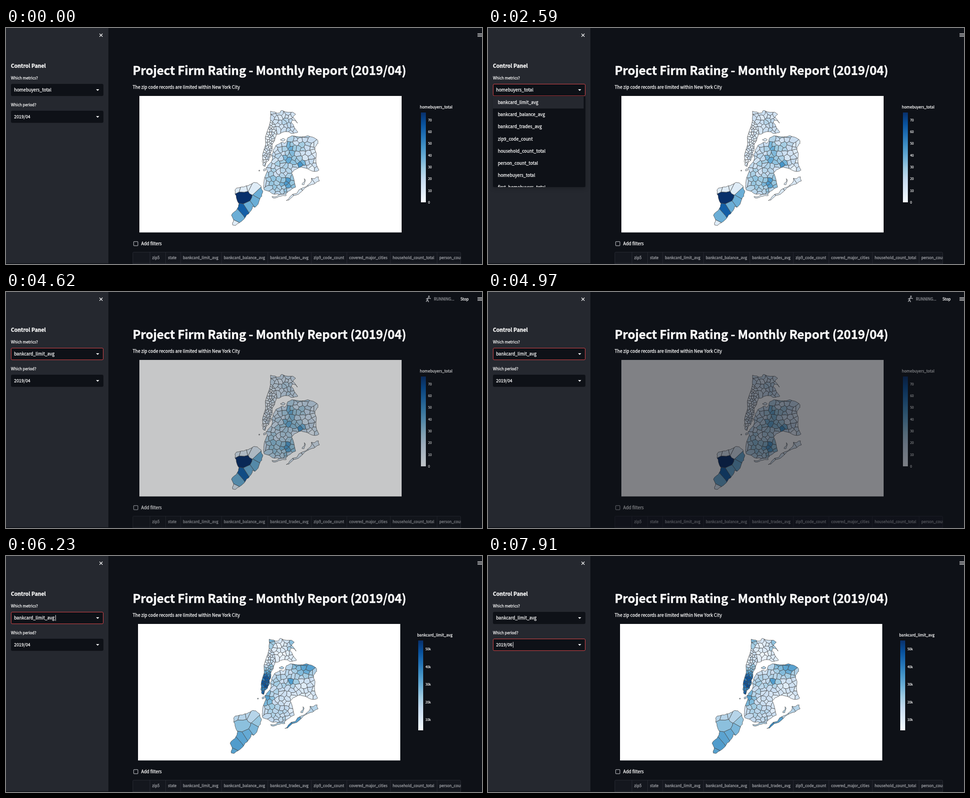
These frames come from a looping animation (1060x528 px, 8 s). An HTML page:

```html
<!DOCTYPE html>
<html lang="en">
<head>
<meta charset="utf-8">
<title>Monthly report dashboard</title>
<style>
html, body { margin: 0; width: 100%; height: 100%; overflow: hidden; background: #0e1117; }
svg { display: block; }
text { font-family: 'Noto Sans CJK JP', 'Noto Sans CJK SC', 'Noto Sans CJK', 'Open Sans', sans-serif; white-space: pre; }
</style>
</head>
<body>
<svg id="stage" width="1060" height="528" viewBox="0 0 1060 528"></svg>
<script>
const BODY = 9.72, SMALL = 8.5, TICK = 7.3;
const WHITE = '#fafafa', DARK = '#0e1117', PANEL = '#25282f', LINE = '#282b33', GREY = '#96989d';
const blues = ['#f7fbff', '#deebf7', '#c6dbef', '#9ecae1', '#6baed6', '#4292c6', '#2171b5', '#08519c', '#08306b'];

// A thin stroke gives light text on dark its heavier look.
const text = (x, y, s, size = BODY, fill = WHITE, more = '') =>
  `<text x="${x}" y="${y}" font-size="${size}" fill="${fill}" stroke="${fill}" stroke-width="${Math.min(.45, size * .03)}" ${more}>${s}</text>`;
const rect = (x, y, w, h, fill, more = '') =>
  `<rect x="${x}" y="${y}" width="${w}" height="${h}" fill="${fill}" ${more}/>`;
const clamp = (v, a = 0, b = 1) => Math.min(b, Math.max(a, v));

// ---------- map ----------
const points = s => s.split(' ').map(p => p.split(',').map(Number));
const bump = (x, y, cx, cy, r) => Math.exp(-((x - cx) ** 2 + (y - cy) ** 2) / r ** 2);

// Repeatable noise from 0 to 1 for a place on the map.
function noise(x, y) {
  const n = Math.sin(Math.round(x * 10) * 12.9898 + Math.round(y * 10) * 78.233) * 43758.5453;
  return n - Math.floor(n);
}

// Each value function returns [homebuyers, limit], both from 0 to 1.
const bronx = {
  size: 9.3,
  edge: '589,186 610,190 614,184 645,193 639,200 649,213 638,206 635,211 650,233 636,236 625,232 604,238 596,212 589,207',
  value: (x, y, n) => [.1 + .14 * n + .14 * bump(x, y, 624, 218, 14),
    .04 + .12 * n + .45 * bump(x, y, 588, 190, 12) + .35 * bump(x, y, 643, 200, 13)]
};
const manhattan = {
  size: 5.6,
  edge: '589,207 596,212 603,237 599,247 593,268 590,286 577,310 572,307 571,288 578,255',
  value: (x, y, n) => [.02 + .2 * n, .05 + .6 * clamp((y - 240) / 30) + .25 * n]
};
const longIsland = {
  size: 10.4,
  edge: '602,262 613,256 621,258 628,245 637,241 672,241 693,250 695,258 688,266 690,292 697,318 690,321 665,313 651,313 636,324 645,356 622,373 598,372 575,362 574,347 582,320 579,313 591,299 592,284 597,270',
  value: (x, y, n) => [
    .16 + .2 * n - .1 * clamp((x - 660) / 20) + .28 * bump(x, y, 625, 297, 9) + .45 * bump(x, y, 654, 302, 9)
      + .2 * bump(x, y, 635, 270, 14) + .3 * bump(x, y, 629, 346, 15) + .18 * bump(x, y, 598, 355, 18),
    .08 + .14 * n + .38 * bump(x, y, 675, 246, 25) + .38 * bump(x, y, 641, 281, 10) + .4 * bump(x, y, 582, 316, 14)
      + .2 * bump(x, y, 605, 280, 24) + .2 * bump(x, y, 600, 355, 32) + .2 * bump(x, y, 648, 250, 16)]
};
const rockaway = {
  sites: '632,382 650,370 668,355 678,349 691,340',
  edge: '624,386 632,378 660,358 680,343 680,336 696,333 698,342 676,352 645,374 630,385',
  value: x => [.15, .3 + .35 * clamp((665 - x) / 20)]
};
const staten = {
  sites: '531,379 530,408 513,421 504,440 517,350 529,353 540,350 552,356 567,372 558,389 541,401',
  edge: '510,363 514,358 535,353 551,346 559,346 572,365 570,376 555,401 549,399 540,416 525,432 512,441 505,441 507,429 502,419 514,406 519,393 513,380',
  value: (x, y) => y < 362 || y > 430
    ? [.12, y < 362 ? .3 : .56]
    : [.5 + .5 * bump(x, y, 531, 379, 6) + .32 * bump(x, y, 530, 408, 6), .38 + .2 * clamp((y - 370) / 45)]
};
const islets = ['592,377 613,372 623,371 624,375 607,377 594,380', '664,337 667,341 664,350 659,350 663,345',
  '611,250 616,247 622,250 618,253', '573,317 577,315 578,319 574,320', '563,318 565,318 565,320 563,320']
  .map(edge => ({ edge, sites: edge.split(' ')[0], value: () => [.12, .32] }));
const regions = [bronx, manhattan, longIsland, rockaway, staten, ...islets];

function blue(v) {
  const p = clamp(v) * 8, i = Math.min(7, Math.floor(p)), f = p - i;
  const ch = (c, k) => parseInt(c.slice(1 + 2 * k, 3 + 2 * k), 16);
  return 'rgb(' + [0, 1, 2].map(k => Math.round(ch(blues[i], k) * (1 - f) + ch(blues[i + 1], k) * f)) + ')';
}

function inside([x, y], poly) {
  let hit = false;
  poly.forEach(([ax, ay], i) => {
    const [bx, by] = poly[(i + 1) % poly.length];
    if ((ay > y) !== (by > y) && x < ax + (y - ay) / (by - ay) * (bx - ax)) hit = !hit;
  });
  return hit;
}

// Keeps the part of poly that is nearer to a than to b.
function cut(poly, a, b) {
  const side = p => (p[0] - (a[0] + b[0]) / 2) * (b[0] - a[0]) + (p[1] - (a[1] + b[1]) / 2) * (b[1] - a[1]);
  const out = [];
  poly.forEach((p, i) => {
    const q = poly[(i + 1) % poly.length], sp = side(p), sq = side(q);
    if (sp <= 0) out.push(p);
    if ((sp < 0) !== (sq < 0) && sp !== sq) {
      const k = sp / (sp - sq);
      out.push([p[0] + k * (q[0] - p[0]), p[1] + k * (q[1] - p[1])]);
    }
  });
  return out;
}

// Bends every side at its middle; a shared side bends the same way for both neighbours.
const roughen = poly => poly.flatMap((p, i) => {
  const q = poly[(i + 1) % poly.length], x = (p[0] + q[0]) / 2, y = (p[1] + q[1]) / 2;
  const bend = Math.min(5, Math.hypot(q[0] - p[0], q[1] - p[1]) * .3);
  return [p, [x + (noise(x, y) - .5) * bend, y + (noise(y, x) - .5) * bend]];
});
const outline = poly => poly.map(p => p.map(n => n.toFixed(1))).join(' ');

function scatter(poly, size) {
  const found = [];
  for (let y = 184, row = 0; y < 380; y += size * .92, row++)
    for (let x = 566 + row % 2 * size / 2; x < 700; x += size) {
      const p = [x + (noise(x, y) - .5) * size * .85, y + (noise(y, x) - .5) * size * .85];
      if (inside(p, poly)) found.push(p);
    }
  return found;
}

for (const r of regions) {
  const poly = points(r.edge), sites = r.sites ? points(r.sites) : scatter(poly, r.size);
  r.coast = outline(roughen(roughen(poly)));
  r.cells = sites.map(s => {
    let cell = [[400, 100], [800, 100], [800, 500], [400, 500]];
    for (const o of sites) if (o !== s) cell = cut(cell, s, o);
    return { shape: outline(roughen(cell)), value: r.value(...s, noise(s[0] + 7, s[1])) };
  });
}

function chart(metric) {
  const dx = metric ? -3 : 0, barX = metric ? 918 : 924, labelX = barX + 16;
  const land = regions.map((r, i) => `<g clip-path="url(#land${i})">` +
    r.cells.map(c => `<polygon points="${c.shape}" fill="${blue(c.value[metric])}"/>`).join('') +
    `</g><polygon points="${r.coast}" fill="none"/>`).join('');
  const ticks = Array.from({ length: metric ? 5 : 8 }, (_, i) => metric
    ? text(labelX, 211.3 + i * 39.4, 50 - 10 * i + 'k', TICK)
    : text(labelX, 208.6 + i * 26.33, 70 - 10 * i, TICK));
  return `<g id="chart${metric}">${rect(297 + dx, 152, 584, 305.4, '#fff')}
    <g transform="translate(${dx} 0)" stroke="#444" stroke-width=".8" stroke-linejoin="round">${land}</g>
    ${rect(barX, 189, 11, 201, 'url(#scale)')}
    ${text(barX - 2.5, 180.3, metric ? 'bankcard_limit_avg' : 'homebuyers_total', SMALL)}${ticks.join('')}</g>`;
}

// ---------- page ----------
const metrics = ['bankcard_limit_avg', 'bankcard_balance_avg', 'bankcard_trades_avg', 'zip9_code_count',
  'household_count_total', 'person_count_total', 'homebuyers_total', 'first_homebuyers_total'];
const periods = ['2019/04', '2019/06'];
const ROW = 27.14;

const select = (id, y) => rect(11.5, y + .5, 205, 26.2, DARK, `id="${id}Box" rx="2.4"`) +
  text(18, y + 17.4, '', BODY, WHITE, `id="${id}Text"`) +
  `<path d="M200.6 ${y + 11.9}h7l-3.5 3.9z" fill="${WHITE}"/>` +
  rect(0, y + 7.2, 1, 13, WHITE, `id="${id}Caret"`);

const menu = (id, y, h, first, width, items) => `<g id="${id}Menu" style="filter:drop-shadow(0 3px 5px rgba(0,0,0,.2))">
  ${rect(11, y, 206, h, DARK, 'rx="2.7"')}
  <svg x="11" y="${y}" width="206" height="${h}">
  ${rect(0, 0, width, ROW, PANEL, `id="${id}Hover"`)}
  ${items.map((s, i) => text(11, first + ROW * i + 17.2, s)).join('')}</svg></g>`;

const columns = [[320, 'zip5'], [355, 'state'], [388.5, metrics[0]], [479.5, metrics[1]], [582.5, metrics[2]],
  [679.5, metrics[3]], [758.5, 'covered_major_cities'], [855.5, metrics[4]], [959.5, metrics[5]]];
const table = `<svg x="282" y="501" width="731" height="27">
  ${rect(.5, .5, 730, 40, '#14171e', `rx="2" stroke="${LINE}"`)}
  ${columns.map(([x, s]) => rect(x - 282, 0, 1, 27, LINE) + text(x - 276.5, 15.6, s, SMALL, '#a3a5aa')).join('')}
  ${rect(0, 25, 731, 1, LINE)}</svg>`;

const stage = document.getElementById('stage');
stage.innerHTML = `<defs>
  <linearGradient id="scale" x1="0" y1="1" x2="0" y2="0">
  ${blues.map((c, i) => `<stop offset="${i / 8}" stop-color="${c}"/>`).join('')}</linearGradient>
  ${regions.map((r, i) => `<clipPath id="land${i}"><polygon points="${r.coast}"/></clipPath>`).join('')}</defs>
  ${rect(0, 0, 1060, 528, DARK)}
  ${text(282, 105, 'Project Firm Rating - Monthly Report (2019/04)', 26.92, WHITE, 'font-weight="700" letter-spacing="-.15"')}
  ${text(282, 136.3, 'The zip code records are limited within New York City')}
  <g id="content">${chart(0)}${chart(1)}
  ${rect(284.3, 477.8, 9.4, 9.4, 'none', 'rx="1.2" stroke="#b4b6bb" stroke-width="1.2"')}
  ${text(301, 486, 'Add filters')}${table}</g>
  <g id="status"><path id="runner" fill="none" stroke="${GREY}" stroke-width="1.9" stroke-linejoin="round"/>
  <circle id="head" cy="9.8" r="1.9" fill="${GREY}"/>
  ${text(953, 19.2, 'RUNNING...', SMALL, GREY)}${text(1012, 19.2, 'Stop', SMALL)}</g>
  <path d="M1050 12.6h10M1050 15.6h10M1050 18.6h10" stroke="${WHITE}" stroke-width="1.3"/>
  ${rect(0, 0, 228, 526.5, PANEL)}
  <path d="M208.2 12.7l6.8 6.8M215 12.7l-6.8 6.8" stroke="${WHITE}" stroke-width="1.3"/>
  ${text(11, 89, 'Control Panel', 11.6, WHITE, 'font-weight="700"')}
  ${text(11, 114.7, 'Which metrics?', SMALL)}${text(11, 174.5, 'Which period?', SMALL)}
  ${select('metric', 125)}${select('period', 185)}
  ${menu('metric', 152.3, 203.7, .7, 202, metrics)}${menu('period', 212.2, 59.7, 2.8, 206, periods)}`;

const el = {};
stage.querySelectorAll('[id]').forEach(n => el[n.id] = n);
const show = (n, on) => n.style.display = on ? '' : 'none';

function setSelect(id, value, caretX, focus, caret) {
  el[id + 'Text'].textContent = value;
  el[id + 'Box'].setAttribute('stroke', focus ? '#e0484b' : DARK);
  el[id + 'Caret'].setAttribute('x', caretX);
  show(el[id + 'Caret'], focus && caret);
}

function setMenu(id, t, from, to, first, row) {
  show(el[id + 'Menu'], t >= from && t < to);
  el[id + 'Menu'].style.opacity = clamp(.82 + (t - from) / 140 * .18);
  el[id + 'Hover'].setAttribute('y', first + row * ROW);
}

// Arms out while standing, limbs swinging and a lean while running.
function setRunner(stride, lean) {
  const x = 938.5, neck = x + lean, drop = stride ? 3 : .4, foot = 1 + 3 * stride;
  el.head.setAttribute('cx', x + lean * 1.5);
  el.runner.setAttribute('d', `M${neck - 5.3} ${13 + drop}L${neck} 13L${neck + 5.3} ${13 + drop * .6}` +
    `M${neck} 13L${x} 17.5M${x - foot} ${22.5 - stride}L${x} 17L${x + foot} 22.5`);
}

const MENU1 = 1750, PICK1 = 3080, RUN = 3570, MOVE = 3920, LOADED = 5460, IDLE = 6230, MENU2 = 6440, PICK2 = 7770;

function caretOn(t) {
  if (t > 5000 && t < IDLE) return false;
  const since = t < PICK1 ? MENU1 : t < IDLE ? PICK1 + 70 : t < PICK2 ? IDLE : PICK2;
  return Math.floor(Math.max(0, t - since) / 490) % 2 === 0;
}

function draw(t) {
  const picked = t >= PICK1, caret = caretOn(t);
  setSelect('metric', metrics[picked ? 0 : 6], picked ? 110 : 102.5, t >= MENU1 && t < MENU2, caret);
  setSelect('period', periods[t < PICK2 ? 0 : 1], 55.5, t >= MENU2, caret);

  const climb = t < 2240 ? 6 : t < 2590 ? Math.max(1, 4 - 2 * Math.floor((t - 2240) / 70)) : 0;
  setMenu('metric', t, MENU1, PICK1, .7, climb);
  setMenu('period', t, MENU2, PICK2, 2.8, t < 7350 ? 0 : 1);

  const loaded = t >= LOADED;
  show(el.chart0, !loaded);
  show(el.chart1, loaded);
  el.content.style.opacity = loaded ? 1 : 1 - .62 * Math.pow(clamp((t - RUN - 500) / 1000), 1.65);

  show(el.status, t >= RUN && t < 5740);
  el.status.style.opacity = Math.min(clamp(.75 + (t - RUN) / 840), clamp((5740 - t) / 210));
  const lean = Math.floor((Math.min(t, 5180) - MOVE) / 140) % 2 && t < 5390;
  if (t < MOVE) setRunner(0, 0);
  else setRunner(lean ? .6 : 1, lean ? 2.2 : 1.2);
}

const start = performance.now();
function frame() {
  draw((performance.now() - start) % 8000);
  requestAnimationFrame(frame);
}
draw(0);
requestAnimationFrame(frame);
</script>
</body>
</html>
```
